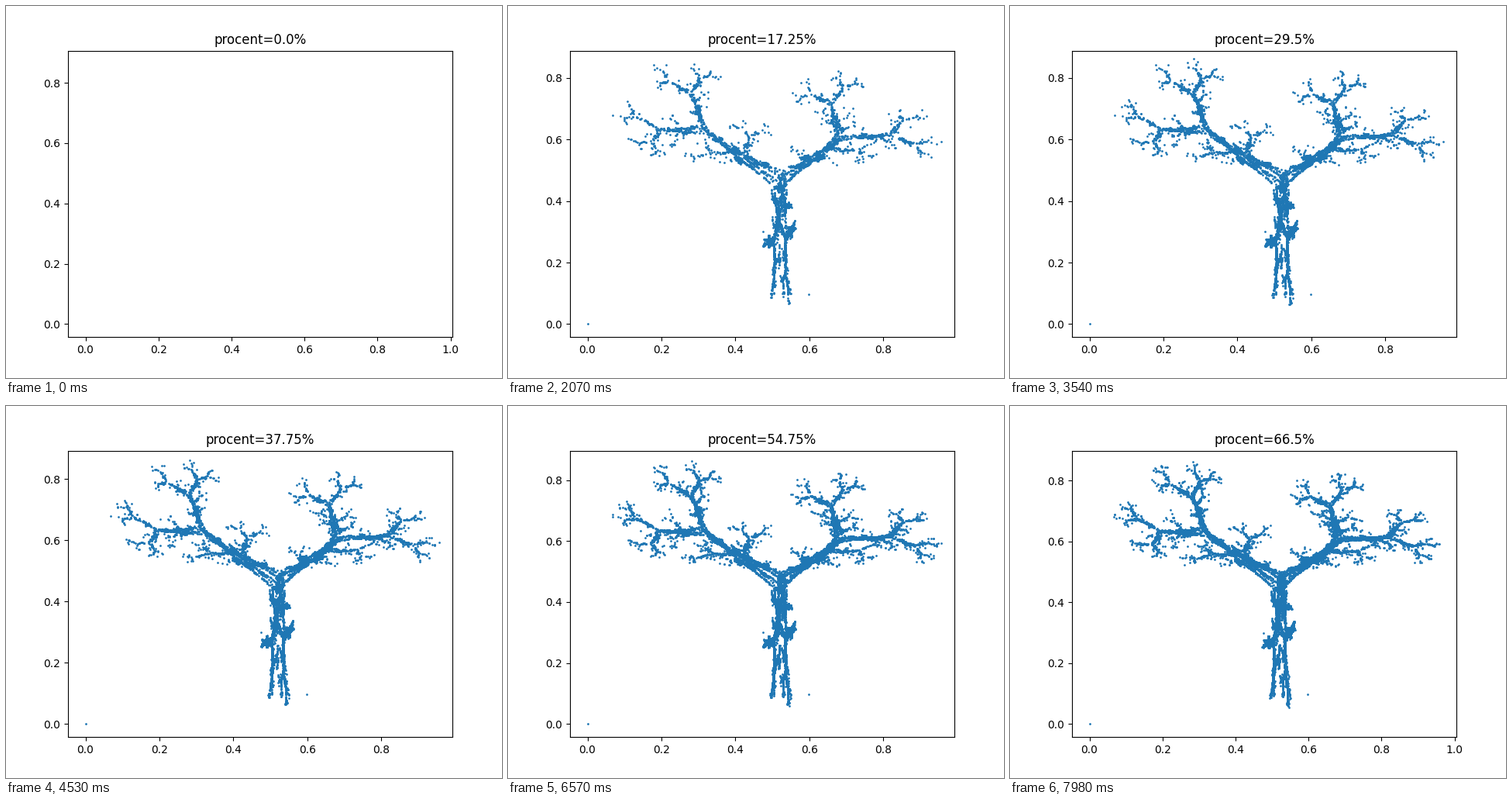
Animation, 640 px wide and 480 px high, one loop 8 s. Source, as a matplotlib script:

```python
import random

import matplotlib.pyplot as plt
import numpy as np
from matplotlib.animation import FuncAnimation

FRAMES = 267
LOOP_MS = 8000
PER_FRAME = 100
PERCENT_STEP = 0.25
MARGIN = 0.05

# Affine maps of the tree: x' = a*x + b*y + e, y' = c*x + d*y + f
MAPS = [
    (0.195, -0.488, 0.344, 0.443, 0.4431, 0.2452),
    (0.462, 0.414, -0.252, 0.361, 0.2511, 0.5692),
    (-0.058, -0.070, 0.453, -0.111, 0.5976, 0.0969),
    (-0.035, 0.070, -0.469, 0.022, 0.4884, 0.5069),
    (-0.637, 0.0, 0.0, 0.501, 0.8562, 0.2513),
]
OPENING = [2, 4]

# (frame, extent) steps at which the axes rescale
RIGHT = [(0, 0.957), (1, 0.9455), (236, 0.957)]
TOP = [(0, 0.8637), (1, 0.8435), (45, 0.8465), (125, 0.850),
       (176, 0.8537), (256, 0.8557)]


def chaos_game(count, seed):
    """Follow one point through randomly chosen maps."""
    rng = random.Random(seed)
    x = y = 0.0
    points = [(x, y)]
    for n in range(count - 1):
        pick = OPENING[n] if n < len(OPENING) else rng.randrange(len(MAPS))
        a, b, c, d, e, f = MAPS[pick]
        x, y = a * x + b * y + e, c * x + d * y + f
        points.append((x, y))
    return np.array(points)


def view(steps, i):
    """Axis limits around the extent reached by frame i."""
    extent = [value for start, value in steps if start <= i][-1]
    return -MARGIN * extent, (1 + MARGIN) * extent


points = chaos_game(PER_FRAME * FRAMES, seed=7)

fig, ax = plt.subplots(figsize=(6.4, 4.8), dpi=100)
dots, = ax.plot([], [], "o", markersize=1, color="C0")
title = ax.set_title("")


def draw(i):
    dots.set_data(*points[:i * PER_FRAME].T)
    ax.set_xlim(view(RIGHT, i))
    ax.set_ylim(view(TOP, i))
    title.set_text(f"procent={i * PERCENT_STEP}%")
    return dots, title


anim = FuncAnimation(fig, draw, frames=FRAMES, interval=LOOP_MS / FRAMES,
                     init_func=lambda: draw(0), repeat=True, repeat_delay=0)
plt.show()
```
